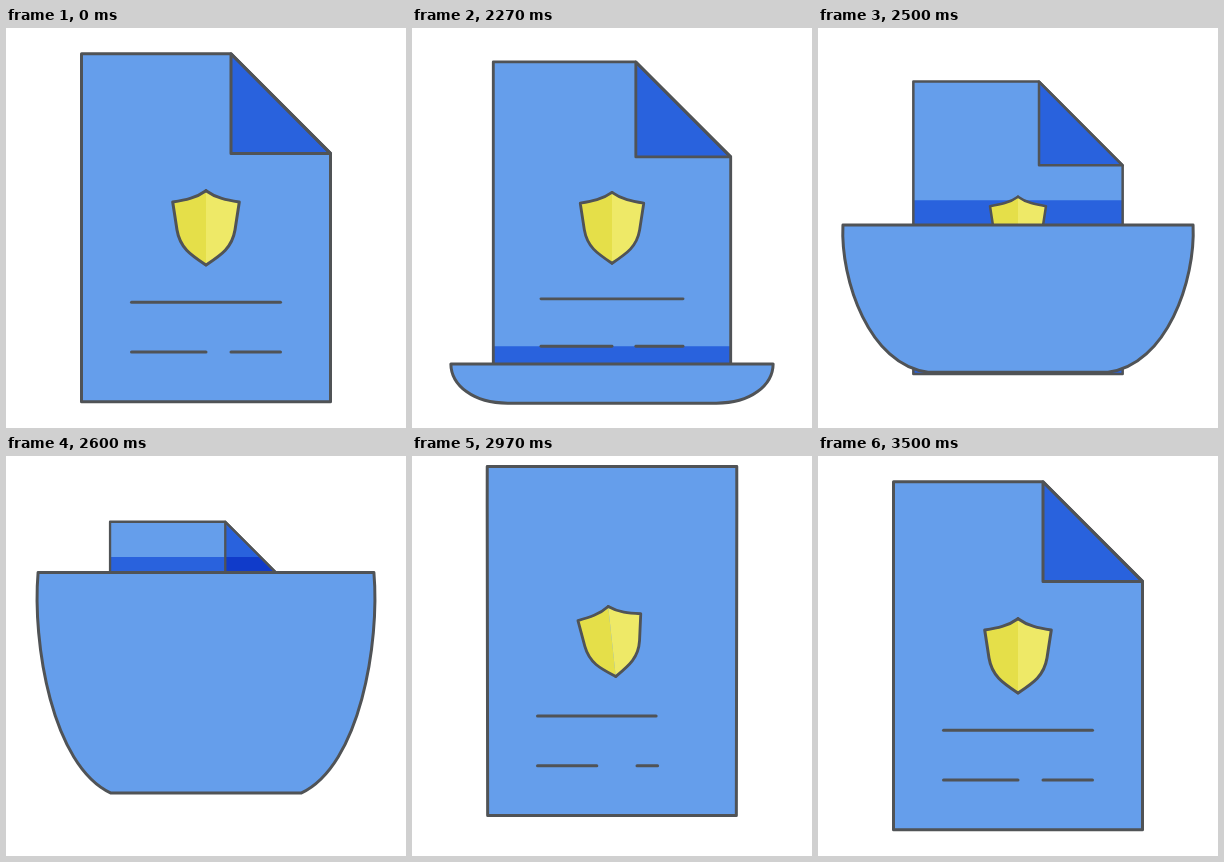
These frames come from a looping animation (400 by 400 pixels, 3.52 s). An HTML page with a canvas:

```html
<!DOCTYPE html>
<html lang="en">
<head>
<meta charset="utf-8">
<title>Secure document</title>
<style>
  html, body { margin: 0; width: 100%; height: 100%; overflow: hidden; background: #fff; }
  canvas { display: block; width: 400px; height: 400px; }
</style>
</head>
<body>
<canvas id="stage" width="400" height="400"></canvas>
<script>
const ctx = document.getElementById('stage').getContext('2d');
const LOOP = 3520;
const INK = '#505356', PAGE = '#659eeb', FOLD = '#2962dd', DEEP = '#103bca';
const LEFT = 75.5, RIGHT = 324.5, TOP = 25.8, BOTTOM = 373.8;

// Each row: time, then values. The flap's left side is a cubic from rim to base.
const flapKeys = [
  [2020, 75.5, 373.8, 75.5, 373.8, 75.5, 373.8, 75.5, 373.8],
  [2200, 48, 360, 48, 371, 62, 381, 92, 381],
  [2420, 25, 261, 25, 305, 58, 356, 110, 356],
  [2600, 32, 117, 26, 187, 46, 310, 105, 337],
  [2800, 64, 31, 60, 145, 66, 260, 83, 374.3],
  [3000, 75.5, 10.3, 75.5, 126, 75.5, 242, 75.5, 358.3]
];
const shadowKeys = [[2020, 0], [2420, 28], [2600, 15.5], [2800, 0]];
const liftKeys = [[2600, 20], [2800, 6.3], [3000, -15.5], [3400, 0]];
// scale, rotation in degrees
const shieldKeys = [[2620, 0, 14], [2800, 0.9, 4], [3000, 0.94, -7], [3200, 0.87, -4], [3440, 1, 0]];

const clamp = v => Math.max(0, Math.min(1, v));
const progress = (t, start, length) => clamp((t - start) / length);
const easeOut = p => 1 - (1 - p) ** 2;
const easeInOut = p => (1 - Math.cos(Math.PI * p)) / 2;

// Smooth spline through the keys, at rest at both ends.
function track(keys, t) {
  const last = keys.length - 1;
  if (t <= keys[0][0]) return keys[0].slice(1);
  if (t >= keys[last][0]) return keys[last].slice(1);
  const i = keys.findIndex(k => k[0] > t) - 1;
  const a = keys[i], b = keys[i + 1], span = b[0] - a[0], u = (t - a[0]) / span;
  const slope = (n, c) => n === 0 || n === last ? 0
    : (keys[n + 1][c] - keys[n - 1][c]) / (keys[n + 1][0] - keys[n - 1][0]);
  return a.slice(1).map((v, k) => {
    const c = k + 1, s = u * u * (3 - 2 * u);
    return v + (b[c] - v) * s
      + span * u * (1 - u) * ((1 - u) * slope(i, c) - u * slope(i + 1, c));
  });
}

function ink(path) {
  ctx.strokeStyle = INK;
  ctx.lineWidth = 3;
  ctx.lineCap = ctx.lineJoin = 'round';
  ctx.stroke(path);
}

function group(x, y, scale, degrees, draw) {
  ctx.save();
  ctx.translate(x, y);
  ctx.rotate(degrees * Math.PI / 180);
  ctx.scale(scale, scale);
  ctx.translate(-200, -200);
  draw();
  ctx.restore();
}

const shieldHalf = 'M200 162.7C190 170 179 172 166.7 174L171 202C174 220 185 227 200 237';
const shieldLeft = new Path2D(shieldHalf);
const shieldRight = new Path2D();
shieldRight.addPath(shieldLeft, new DOMMatrix([-1, 0, 0, 1, 400, 0]));

function drawShield() {
  ctx.fillStyle = '#e5df49';
  ctx.fill(shieldLeft);
  ctx.fillStyle = '#eee967';
  ctx.fill(shieldRight);
  ink(shieldLeft);
  ink(shieldRight);
}

function drawLine(x1, x2, y, amount) {
  if (amount <= 0) return;
  const line = new Path2D();
  line.moveTo(x1, y);
  line.lineTo(x1 + (x2 - x1) * amount, y);
  ink(line);
}

function drawLines(long, late) {
  drawLine(125.5, 274.5, 274.3, long);
  drawLine(125.5, 200, 324, long);
  drawLine(225, 274.5, 324, late);
}

// turn: -1 is a square corner, 0 lies on the diagonal, 1 is folded flat.
function addCorner(path, turn) {
  const bend = Math.sign(turn) * Math.sqrt(Math.abs(turn));
  path.quadraticCurveTo(250 - 25 * bend, 50.6 + 25 * bend, 274.8 - 49.8 * turn, 75.6 + 49.8 * turn);
  path.quadraticCurveTo(299.6 - 25 * bend, 100.4 + 25 * bend, RIGHT, 125.4);
}

function drawPaper(turn, shadowTop) {
  const sheet = new Path2D(), fold = new Path2D();
  sheet.moveTo(225, TOP);
  if (turn < 0) addCorner(sheet, turn);
  else sheet.lineTo(RIGHT, 125.4);
  sheet.lineTo(RIGHT, BOTTOM);
  sheet.lineTo(LEFT, BOTTOM);
  sheet.lineTo(LEFT, TOP);
  sheet.closePath();
  if (turn >= 0) {
    fold.moveTo(225, TOP);
    addCorner(fold, turn);
    fold.closePath();
  }
  const paint = (front, back) => {
    ctx.fillStyle = front;
    ctx.fill(sheet);
    ctx.fillStyle = back;
    ctx.fill(fold);
  };
  paint(PAGE, FOLD);
  if (shadowTop < BOTTOM) {
    ctx.save();
    ctx.beginPath();
    ctx.rect(0, shadowTop, 400, 400);
    ctx.clip();
    paint(FOLD, DEEP);
    ctx.restore();
  }
  ink(sheet);
  ink(fold);
}

function drawFlap([rx, ry, ax, ay, bx, by, x, y]) {
  const flap = new Path2D();
  flap.moveTo(rx, ry);
  flap.bezierCurveTo(ax, ay, bx, by, x, y);
  flap.lineTo(400 - x, y);
  flap.bezierCurveTo(400 - bx, by, 400 - ax, ay, 400 - rx, ry);
  flap.closePath();
  ctx.fillStyle = PAGE;
  ctx.fill(flap);
  ink(flap);
}

function drawNewContent(t, lift) {
  group(200, 200 + lift, 1, 0, () => drawLines(
    easeOut(progress(t, 2620, 640)), easeOut(progress(t, 2820, 640))));
  const [scale, angle] = track(shieldKeys, t);
  if (scale > 0) group(200, 200 + lift, scale, angle, drawShield);
}

function render(t) {
  ctx.fillStyle = '#fff';
  ctx.fillRect(0, 0, 400, 400);
  const [lift] = track(liftKeys, t);

  if (t >= 3000) {
    const turn = 2 * easeInOut(progress(t, 3000, 340)) - 1;
    group(200, 200 + lift, 1, 0, () => drawPaper(turn, BOTTOM));
    drawNewContent(t, lift);
    return;
  }

  const flap = track(flapKeys, t), folding = t > 2020;
  if (t < 2780) {
    const scale = folding ? 1 - 0.112 * ((t - 2000) / 420) ** 2 : 1;
    const shadowY = flap[1] - track(shadowKeys, t)[0];
    group(200, 200, scale, 0, () => {
      drawPaper(1, folding ? 200 + (shadowY - 200) / scale : BOTTOM);
      drawLines(1, 1);
      drawShield();
    });
  }
  if (folding) {
    drawFlap(flap);
    drawNewContent(t, lift);
  }
}

function tick() {
  render(performance.now() % LOOP);
  requestAnimationFrame(tick);
}
tick();
</script>
</body>
</html>
```
